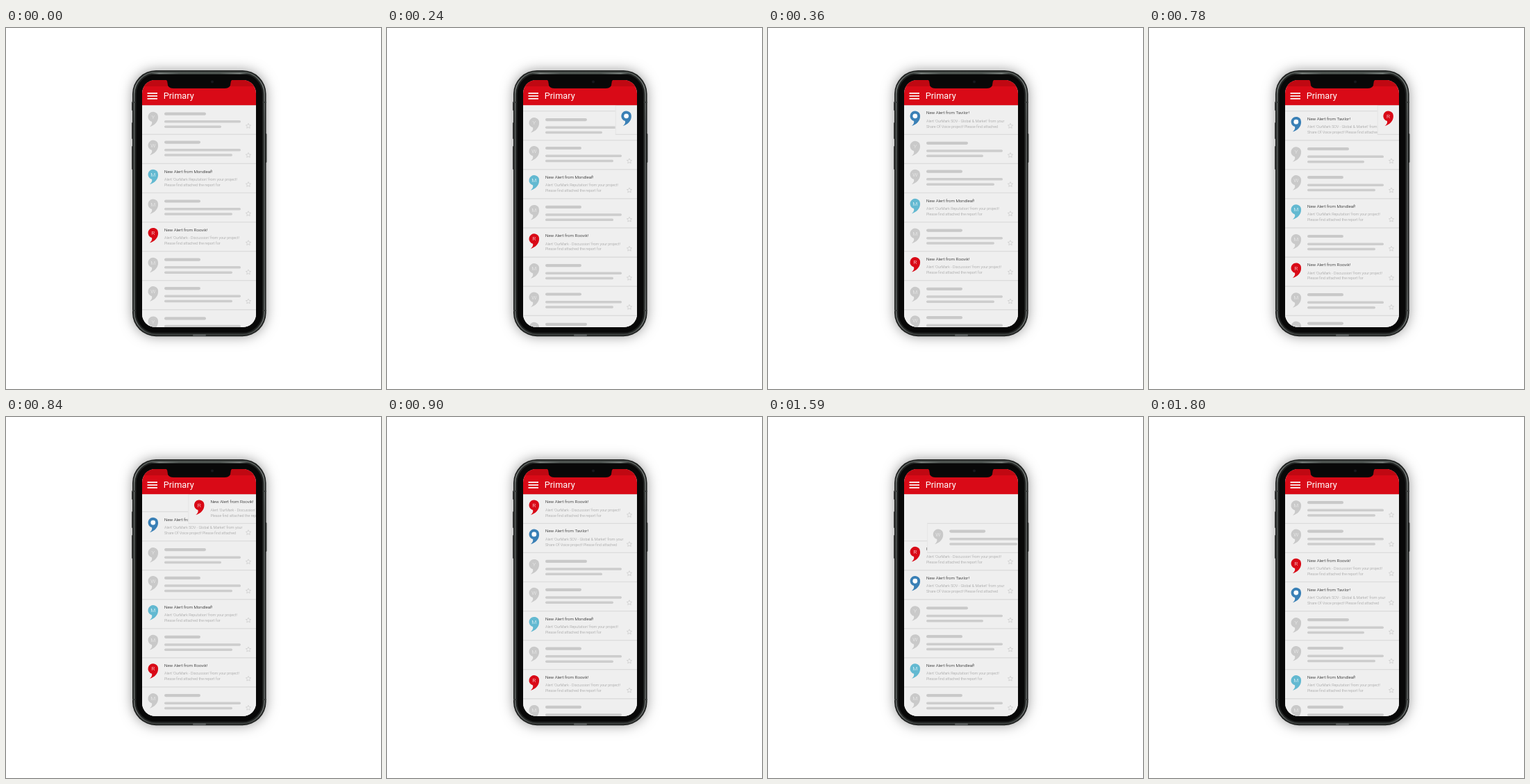
Write an HTML page with a canvas that moves like this. It is 540x520 px and loops after 2.7 s.

```html
<!DOCTYPE html>
<html lang="en">
<head>
<meta charset="utf-8">
<title>Phone inbox alerts</title>
<style>
html, body { margin: 0; width: 100%; height: 100%; overflow: hidden; background: #fff; }
canvas { display: block; width: 540px; height: 520px; }
</style>
</head>
<body>
<canvas id="stage"></canvas>
<script>
const W = 540, H = 520, LOOP = 2700, TICK = 30, STEPS = 5;
const LEFT = 196, RIGHT = 360, TOP = 111.2, PITCH = 42.1, SLIDE = 166;
const FONT = 'Roboto, sans-serif';
const GREY = '#c9c9c9', RED = '#d90a17', PAPER = '#efefef';

const canvas = document.getElementById('stage');
const ctx = canvas.getContext('2d');
const dpr = window.devicePixelRatio || 1;
canvas.width = W * dpr;
canvas.height = H * dpr;

// Placeholder mails have bars; alerts have text.
const mailY = { letter: 'Y', bars: [60, 110, 82], dy: 1.2 };
const mailW = { letter: 'W', bars: [52, 110, 98], dy: 0 };
const mailM = { letter: 'M', bars: [52, 110, 98], dy: 0.7 };
const alertM = {
  letter: 'M', color: '#63b9d1', title: 'New Alert from Mondleaf!',
  lines: ["Alert 'OurMark Reputation' from your project!", 'Please find attached the report for']
};
const alertR = {
  letter: 'R', color: RED, title: 'New Alert from Roovik!',
  lines: ["Alert 'OurMark - Discussion' from your project!", 'Please find attached the report for']
};
const alertT = {
  color: '#3a80b6', title: 'New Alert from Tavilor!',
  lines: ["Alert 'OurMark SOV - Global & Market' from your", 'Share Of Voice project! Please find attached']
};
const inbox = [mailY, mailW, alertM, mailM, alertR, mailM, mailW, mailY];

function box(x, y, w, h, r) {
  ctx.beginPath();
  ctx.roundRect(x, y, w, h, r);
}

function fillBox(x, y, w, h, r, color) {
  box(x, y, w, h, r);
  ctx.fillStyle = color;
  ctx.fill();
}

function text(str, x, y, size, weight, color, align = 'left') {
  ctx.font = `${weight} ${size}px ${FONT}`;
  ctx.fillStyle = color;
  ctx.textAlign = align;
  ctx.fillText(str, x, y);
}

function gradient(x0, y0, x1, y1, stops) {
  const g = ctx.createLinearGradient(x0, y0, x1, y1);
  stops.forEach(([pos, color]) => g.addColorStop(pos, color));
  return g;
}

function pin(x, y, row) {
  const r = 7.3;
  ctx.beginPath();
  ctx.arc(x, y, r, 1.8, Math.PI * 2);
  ctx.bezierCurveTo(x + r, y + 7.5, x + 1.8, y + 12.5, x - 5, y + 14.3);
  ctx.quadraticCurveTo(x - 0.8, y + 11, x - 1.7, y + 7.1);
  ctx.fillStyle = row.color || GREY;
  ctx.fill();
  if (row.letter) {
    text(row.letter, x, y + 2.8, 8.1, 300, row.color ? '#fff' : '#f0f0f0', 'center');
  } else {
    ctx.beginPath();
    ctx.arc(x, y, 3.4, 0, Math.PI * 2);
    ctx.fillStyle = '#fff';
    ctx.fill();
  }
}

function star(x, y) {
  ctx.beginPath();
  for (let i = 0; i < 10; i++) {
    const r = i % 2 ? 1.8 : 3.8;
    const a = i * Math.PI / 5 - Math.PI / 2;
    ctx.lineTo(x + r * Math.cos(a), y + r * Math.sin(a));
  }
  ctx.closePath();
  ctx.strokeStyle = '#cbcbcb';
  ctx.lineWidth = 0.7;
  ctx.stroke();
}

function drawRow(row, y, p = 1) {
  ctx.save();
  ctx.translate(SLIDE * (1 - p), y);
  ctx.fillStyle = PAPER;
  ctx.fillRect(LEFT, 0, RIGHT - LEFT, PITCH);
  ctx.fillStyle = '#dcdcdc';
  ctx.fillRect(LEFT, -0.6, RIGHT - LEFT, 1.2);
  ctx.fillRect(LEFT, PITCH - 0.6, RIGHT - LEFT, 1.2);
  if (p < 1) {
    ctx.fillStyle = '#e5e5e5';
    ctx.fillRect(LEFT, 0, 1, PITCH);
  }

  const dy = row.dy || 0;
  pin(211.8, 15.6 + dy, row);
  star(349, 30);
  if (row.bars) {
    const [a, b, c] = row.bars;
    fillBox(228, 9.2 + dy, a, 4.2, 2.1, GREY);
    fillBox(228, 20.7 + dy, b, 3.5, 1.7, '#cdcdcd');
    fillBox(228, 28 + dy, c, 3.5, 1.7, '#cdcdcd');
  } else {
    text(row.title, 228, 13.1, 6.2, 300, '#000');
    row.lines.forEach((line, i) => text(line, 228, 24.5 + i * 7.8, 5.42, 300, '#979797'));
  }
  ctx.restore();
}

// Stepped progress from 0 to 1; the first step lands at the start time.
function progress(t, start) {
  const n = Math.floor((t - start) / TICK) + 1;
  return Math.max(0, Math.min(STEPS, n)) / STEPS;
}

function drawList(t) {
  const a = progress(t, 240), b = progress(t, 780);
  const c = progress(t, 1500), d = progress(t, 1680);
  const at = n => TOP + n * PITCH;
  inbox.forEach((row, i) => drawRow(row, at(i + a + b + 2 * c)));
  if (a) drawRow(alertT, at(b + 2 * c), a);
  if (b) drawRow(alertR, at(2 * c), b);
  if (c) drawRow(mailW, at(1), c);
  if (d) drawRow(mailM, at(0), d);
}

function drawHeader() {
  ctx.fillStyle = RED;
  ctx.fillRect(LEFT, 74, RIGHT - LEFT, 37.2);
  ctx.fillStyle = '#c00812';
  ctx.fillRect(LEFT, 74, RIGHT - LEFT, 10);
  ctx.fillStyle = '#fff';
  [93.2, 97.1, 101].forEach(y => ctx.fillRect(203.5, y, 14.5, 1.7));
  text('Primary', 226.8, 102, 12.7, 400, '#fff');
}

function drawBody() {
  // side buttons
  [[106, 13], [136, 24], [170, 34]].forEach(([y, h]) => fillBox(181.1, y, 3, h, 1, '#3c3f3e'));
  fillBox(372.4, 152, 3, 42, 1, '#3c3f3e');

  ctx.save();
  ctx.shadowColor = 'rgba(0,0,0,.4)';
  ctx.shadowBlur = 18 * dpr;
  fillBox(182, 61, 192.6, 383.2, 34, '#1f2120');
  ctx.restore();

  box(184.6, 63.6, 187.4, 378, 31.5);
  ctx.strokeStyle = gradient(0, 61, 0, 444, [
    [0, '#4a504d'], [0.06, '#777c7a'], [0.2, '#5a5e5d'], [0.8, '#5a5e5d'], [0.95, '#6d7170'], [1, '#363938']
  ]);
  ctx.lineWidth = 1.6;
  ctx.stroke();
  fillBox(187.6, 66.4, 181.4, 372.4, 28.5, '#080808');

  // light along the top edge
  ctx.fillStyle = gradient(206, 0, 351, 0, [
    [0, 'rgba(130,140,135,0)'], [0.1, '#8a928e'], [0.3, '#555c58'],
    [0.7, '#555c58'], [0.9, '#8a928e'], [1, 'rgba(130,140,135,0)']
  ]);
  ctx.fillRect(206, 64.6, 145, 1.8);

  // antenna bands and port
  ctx.fillStyle = '#3a3d3c';
  [106, 406].forEach(y => {
    ctx.fillRect(182, y, 4.4, 2);
    ctx.fillRect(370.2, y, 4.4, 2);
  });
  fillBox(269, 441.6, 19, 1.8, 0.9, '#656968');
}

function drawNotch() {
  ctx.beginPath();
  ctx.moveTo(229, 74);
  ctx.quadraticCurveTo(232.5, 75, 232.5, 79);
  ctx.quadraticCurveTo(232.5, 87, 241, 87);
  ctx.lineTo(315, 87);
  ctx.quadraticCurveTo(323.5, 87, 323.5, 79);
  ctx.quadraticCurveTo(323.5, 75, 327, 74);
  ctx.fillStyle = '#080808';
  ctx.fill();
  ctx.beginPath();
  ctx.arc(297, 77.5, 2, 0, Math.PI * 2);
  ctx.fillStyle = '#17191d';
  ctx.fill();
}

function draw(t) {
  ctx.setTransform(dpr, 0, 0, dpr, 0, 0);
  ctx.fillStyle = '#fff';
  ctx.fillRect(0, 0, W, H);
  drawBody();
  ctx.save();
  box(LEFT, 75, RIGHT - LEFT, 356, 19);
  ctx.clip();
  ctx.fillStyle = PAPER;
  ctx.fillRect(LEFT, 75, RIGHT - LEFT, 356);
  drawList(t);
  drawHeader();
  drawNotch();
  ctx.restore();
}

function frame() {
  draw(performance.now() % LOOP);
  requestAnimationFrame(frame);
}
frame();
</script>
</body>
</html>
```
